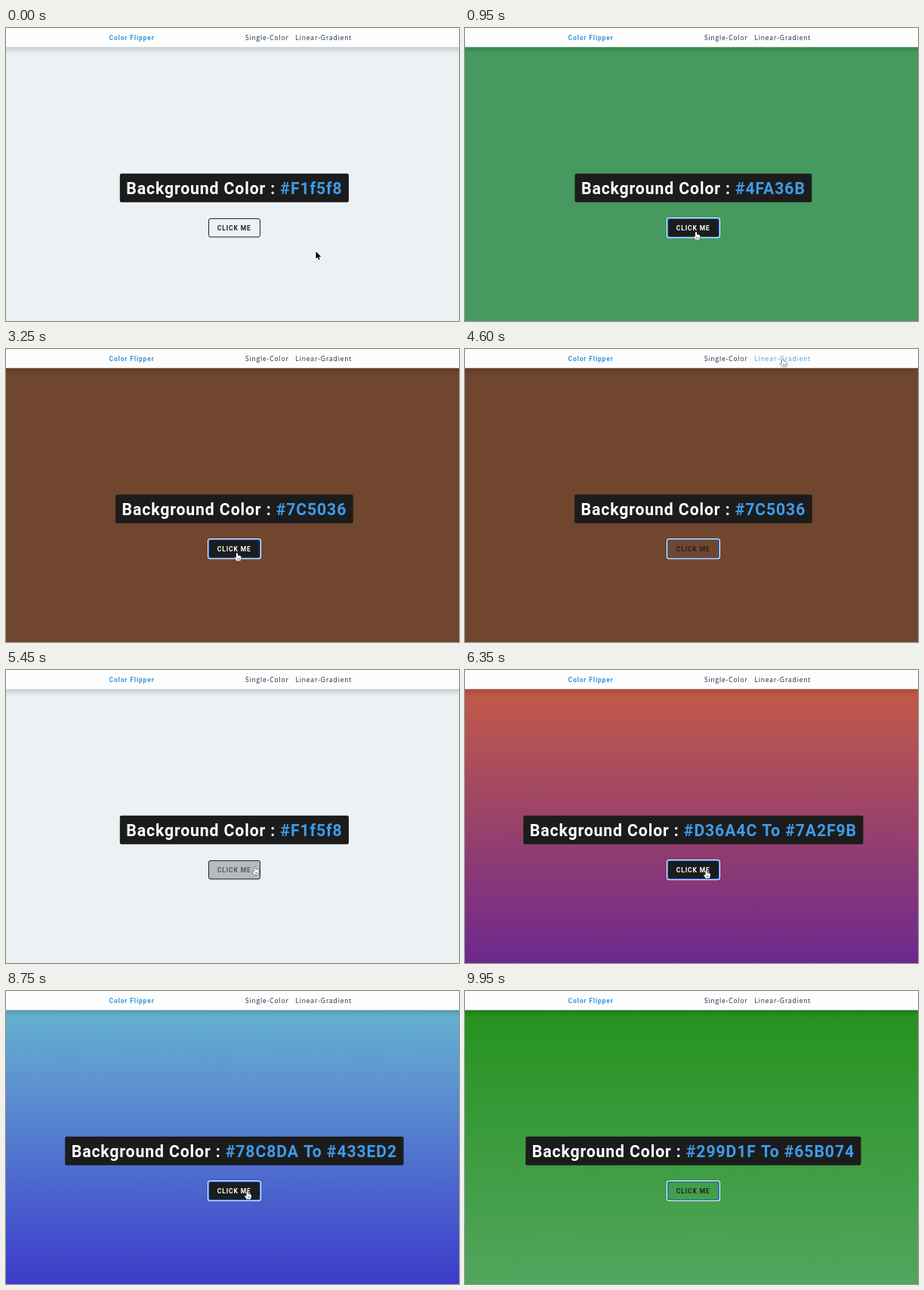
These frames come from a looping animation (600 by 388 pixels, 10 s). An HTML page with a canvas:

```html
<!DOCTYPE html>
<html lang="en">
<head>
<meta charset="utf-8">
<title>Color Flipper</title>
<style>
  html, body { margin: 0; width: 100%; height: 100%; overflow: hidden; background: #ecf1f4; }
  canvas { display: block; width: 600px; height: 388px; }
</style>
</head>
<body>
<canvas id="stage" width="600" height="388"></canvas>
<script>
const ctx = document.getElementById('stage').getContext('2d');
const LOOP = 10000, WIDTH = 600, HEIGHT = 388;
const REM = 8.51, SPACING = 0.851, CENTER = 302.4;
const DARK = '#1c1c1c', INK = '#222222', BLUE = '#3e9be9';
const ROBOTO = 'Roboto, sans-serif', OPEN = '"Open Sans", sans-serif';
const BUTTON = { x: 268, y: 252, w: 69, h: 25.3 };

// time, label, top color, bottom color
const pages = [
  [0, '#F1f5f8', '#ecf1f4'],
  [850, '#4FA36B', '#469a5f'],
  [1450, '#B83BF9', '#ab31f6'],
  [2050, '#C98A2E', '#be7d27'],
  [2600, '#3D7E95', '#35728a'],
  [3150, '#7C5036', '#70462e'],
  [4850, '#F1f5f8', '#ecf1f4'],
  [5850, '#D36A4C To #7A2F9B', '#c95e42', '#6d288e'],
  [6500, '#3FB58C To #2A5FC4', '#38a97f', '#2453b9'],
  [7150, '#2E96D6 To #5616D4', '#2786cd', '#4519cb'],
  [7850, '#B54E8F To #E0A83C', '#a94482', '#d89c33'],
  [8500, '#78C8DA To #433ED2', '#6abbd1', '#3c3bca'],
  [9420, '#299D1F To #65B074', '#22911a', '#52a55e']
];

// time, x, y of the pointer tip
const path = [
  [0, 410.5, 296], [250, 410.5, 296], [750, 306, 270], [3750, 306, 270],
  [4450, 421, 13], [4900, 421, 13], [5450, 329.5, 260.5], [5700, 319.5, 265.3]
];
const POINTER_GONE = 9620;
const buttonHovers = [[580, 3860], [5375, POINTER_GONE]];
const linkHover = [4370, 4960];
const focusSpans = [[850, 4850], [5850, LOOP]];

const arrow = new Path2D('M0 0 V9.6 L2.2 7.6 L3.7 11 L5.3 10.3 L3.8 7 H6.8 Z');
const hand = new Path2D(
  'M-1 .8 Q0 -.7 1 .8 V3.5 Q2 2.7 2.7 3.8 Q3.7 3.2 4.2 4.3 Q5.4 4 5.4 5.4 ' +
  'V7.4 L4.4 10.4 H-.8 L-3.2 6.8 Q-3.4 5 -1 6.5 Z');

const clamp = v => Math.max(0, Math.min(1, v));
const mix = (a, b, k) => a + (b - a) * k;
const within = (t, [from, to]) => t >= from && t < to;
const lastBefore = (list, t) => list.filter(item => item[0] <= t).pop();

function text(str, x, y, font, color) {
  ctx.font = font;
  ctx.letterSpacing = SPACING + 'px';
  ctx.fillStyle = color;
  ctx.fillText(str, x, y);
  return ctx.measureText(str).width;
}

function roundRect(x, y, w, h, r) {
  ctx.beginPath();
  ctx.roundRect(x, y, w, h, r);
}

function strokeButton(grow, width, color) {
  roundRect(BUTTON.x - grow, BUTTON.y - grow, BUTTON.w + 2 * grow, BUTTON.h + 2 * grow, 2.5 + Math.max(0, grow));
  ctx.lineWidth = width;
  ctx.strokeStyle = color;
  ctx.stroke();
}

function drawBackground([, , top, bottom = top]) {
  const fill = ctx.createLinearGradient(0, 0, 0, HEIGHT);
  fill.addColorStop(0, top);
  fill.addColorStop(1, bottom);
  ctx.fillStyle = fill;
  ctx.fillRect(0, 0, WIDTH, HEIGHT);
}

function drawNav(t) {
  ctx.save();
  ctx.shadowColor = 'rgba(0,0,0,.22)';
  ctx.shadowBlur = 8;
  ctx.shadowOffsetY = 2.7;
  ctx.fillStyle = '#fdfdfd';
  ctx.fillRect(-20, -20, WIDTH + 40, 45.3);
  ctx.restore();
  text('Color Flipper', 136.5, 15.5, `700 ${REM}px ${ROBOTO}`, '#3594dc');
  const link = `400 ${REM}px ${OPEN}`;
  text('Single-Color', 316.9, 16.2, link, '#102a42');
  text('Linear-Gradient', 383.4, 16.2, link, within(t, linkHover) ? BLUE : '#102a42');
}

function drawHeading(label) {
  const font = `700 ${REM * 2.5}px ${ROBOTO}`, lead = 'Background Color : ';
  ctx.font = font;
  ctx.letterSpacing = SPACING + 'px';
  const width = ctx.measureText(lead).width + ctx.measureText(label).width + 2 * REM;
  const left = CENTER - width / 2;
  roundRect(left, 192.8, width, 38, 2.2);
  ctx.fillStyle = DARK;
  ctx.fill();
  const used = text(lead, left + REM, 219.5, font, '#fff');
  text(label, left + REM + used, 219.5, font, BLUE);
}

function drawButton(t) {
  const hover = buttonHovers.reduce(
    (sum, [on, off]) => sum + clamp((t - on) / 300) - clamp((t - off) / 300), 0);
  roundRect(BUTTON.x, BUTTON.y, BUTTON.w, BUTTON.h, 2.5);
  ctx.fillStyle = `rgba(28,28,28,${hover})`;
  ctx.fill();
  strokeButton(-0.5, 1, INK);
  if (focusSpans.some(span => within(t, span))) {
    strokeButton(0.4, 1.2, '#fff');
    strokeButton(-0.7, 1.3, '#1a66d2');
  }
  const shade = Math.round(mix(34, 255, hover));
  text('CLICK ME', 279.8, 267.6, `700 ${REM}px ${ROBOTO}`, `rgb(${shade},${shade},${shade})`);
}

function drawPointer(t) {
  if (t >= POINTER_GONE) return;
  const from = lastBefore(path, t);
  const to = path[path.indexOf(from) + 1] || from;
  const u = to === from ? 0 : (t - from[0]) / (to[0] - from[0]);
  const k = u * u * (3 - 2 * u);
  const isHand = [...buttonHovers, linkHover].some(span => within(t, span));
  const shape = isHand ? hand : arrow;
  ctx.save();
  ctx.translate(mix(from[1], to[1], k), mix(from[2], to[2], k));
  ctx.lineJoin = 'round';
  ctx.lineWidth = isHand ? 1 : 1.4;
  ctx.strokeStyle = isHand ? '#111' : '#fff';
  ctx.fillStyle = isHand ? '#fff' : '#000';
  ctx.stroke(shape);
  ctx.fill(shape);
  if (isHand) {
    ctx.lineWidth = 0.5;
    ctx.stroke(new Path2D('M.6 7 V9 M2 7 V9 M3.4 7 V9'));
  }
  ctx.restore();
}

function draw(now) {
  const t = now % LOOP;
  const page = lastBefore(pages, t);
  drawBackground(page);
  drawNav(t);
  drawHeading(page[1]);
  drawButton(t);
  drawPointer(t);
}

const start = performance.now();
function tick() {
  draw(performance.now() - start);
  requestAnimationFrame(tick);
}
tick();
</script>
</body>
</html>
```
